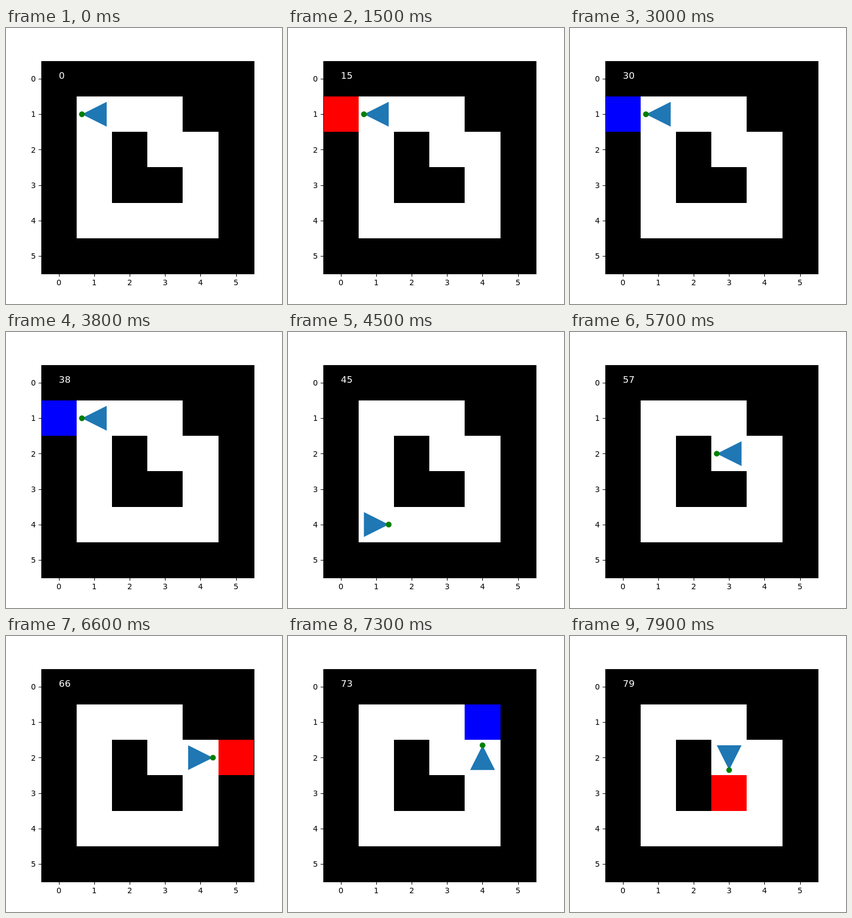
Write an HTML page that moves like this. It is 500 by 500 pixels and loops after 8000 ms.

```html
<!DOCTYPE html>
<html lang="en">
<head>
<meta charset="utf-8">
<title>Maze agent</title>
<style>
  html, body { margin: 0; width: 100%; height: 100%; overflow: hidden; background: #fff; }
  svg { display: block; width: 500px; height: 500px; }
  text { font-family: "DejaVu Sans", sans-serif; font-size: 13.89px; }
  #count { font-size: 16.67px; fill: #fff; }
</style>
</head>
<body>
<svg viewBox="0 0 500 500">
  <g id="cells" shape-rendering="crispEdges"></g>
  <rect id="mark" shape-rendering="crispEdges"/>
  <g id="agent">
    <path d="M22.46 0L-22.46 -22.46V22.46Z" fill="#1f77b4"/>
    <circle cx="22.46" r="5.2" fill="#008000"/>
  </g>
  <g id="axes" stroke="#000" stroke-width="1.11" fill="none">
    <rect x="64.5" y="60.5" width="385" height="385"/>
  </g>
  <g id="labels"></g>
  <text id="count" x="95.83" y="92"></text>
</svg>
<script>
const STEP = 100, LOOP = 8000, CELL = 64.16, LEFT = 63.75, TOP = 60;
const maze = ['######', '#...##', '#.#..#', '#.##.#', '#....#', '######'];

// F: go forward (bump marks the wall red), T: touch the wall (blue), L: turn left
const plan = 'F'.repeat(22) + 'T'.repeat(10) + 'F'.repeat(5) + 'TL' +
  'FFFFTL' + 'FFFFTL' + 'FFFTL' + 'FFTL' + 'FTTL' + 'FFTFTTL' + 'FTL' + 'FFTL' + 'F';
const dirs = [[1, 0], [0, -1], [-1, 0], [0, 1]];

const $ = id => document.getElementById(id);
const edgeX = i => Math.round(LEFT + CELL * i);
const edgeY = i => Math.round(TOP + CELL * i);
const midX = i => LEFT + CELL * (i + 0.5);
const midY = i => TOP + CELL * (i + 0.5);

function add(parent, name, attrs, text = '') {
  const el = document.createElementNS('http://www.w3.org/2000/svg', name);
  set(el, attrs);
  el.textContent = text;
  $(parent).appendChild(el);
}

function set(el, attrs) {
  for (const key in attrs) el.setAttribute(key, attrs[key]);
}

function cellBox(x, y) {
  return {
    x: edgeX(x), y: edgeY(y),
    width: edgeX(x + 1) - edgeX(x), height: edgeY(y + 1) - edgeY(y)
  };
}

maze.forEach((row, y) => [...row].forEach((c, x) =>
  add('cells', 'rect', { ...cellBox(x, y), fill: c === '#' ? '#000' : '#fff' })));

for (let i = 0; i < 6; i++) {
  const x = Math.round(midX(i)) + 0.5, y = Math.round(midY(i)) + 0.5;
  add('axes', 'path', { d: `M${x} 445.5V450.4M64.5 ${y}H59.1` });
  add('labels', 'text', { x: midX(i), y: 466, 'text-anchor': 'middle' }, i);
  add('labels', 'text', { x: 54, y: Math.round(midY(i) + 5.2), 'text-anchor': 'end' }, i);
}

function simulate() {
  let x = 1, y = 1, dir = 2;
  const states = [{ x, y, dir }];
  for (const act of plan) {
    const [dx, dy] = dirs[dir];
    const front = [x + dx, y + dy];
    const wall = maze[front[1]][front[0]] === '#';
    let color = null;
    if (act === 'L') dir = (dir + 1) % 4;
    else if (wall) color = act === 'F' ? '#f00' : '#00f';
    else if (act === 'F') [x, y] = front;
    states.push({ x, y, dir, color, front });
  }
  return states;
}

const states = simulate();
let shown = -1;

function draw() {
  const step = Math.floor(performance.now() % LOOP / STEP);
  if (step !== shown) {
    shown = step;
    const s = states[step];
    set($('agent'), {
      transform: `translate(${midX(s.x)} ${midY(s.y)}) rotate(${-90 * s.dir})`
    });
    set($('mark'), s.color ? { ...cellBox(...s.front), fill: s.color } : { fill: 'none' });
    $('count').textContent = step;
  }
  requestAnimationFrame(draw);
}
draw();
</script>
</body>
</html>
```
